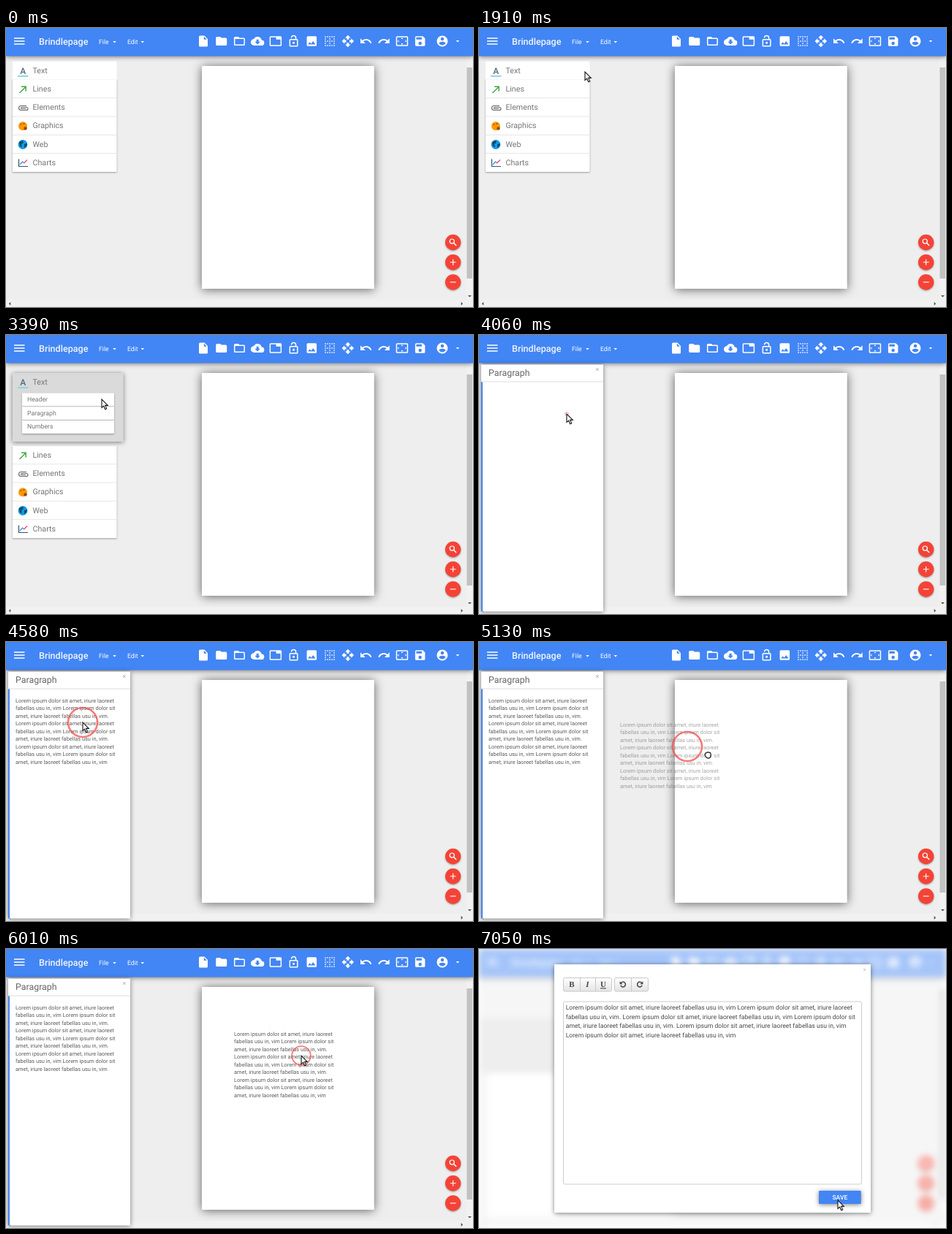
An HTML page for the animation above (8 s loop, 639 by 382 pixels).

```html
<!DOCTYPE html>
<html lang="en">
<head>
<meta charset="utf-8">
<title>Page editor</title>
<style>
html, body { margin: 0; width: 100%; height: 100%; overflow: hidden; background: #fff; }
svg { display: block; width: 639px; height: 382px; font-family: Roboto, Arial, sans-serif; text-rendering: geometricPrecision; }
.low { filter: drop-shadow(0 1px 1px rgba(0,0,0,.35)); }
.mid { filter: drop-shadow(0 1px 3px rgba(0,0,0,.5)); }
.deep { filter: drop-shadow(0 1px 7px rgba(0,0,0,.6)); }
</style>
</head>
<body>
<svg id="stage" viewBox="0 0 639 382"></svg>
<script>
const LOOP = 8000;
const stage = document.getElementById('stage');

// ---- markup helpers ----
const rect = (x, y, w, h, fill, extra = '') =>
  `<rect x="${x}" y="${y}" width="${w}" height="${h}" fill="${fill}" ${extra}/>`;
const text = (x, y, size, fill, str, extra = '') =>
  `<text x="${x}" y="${y}" font-size="${size}" fill="${fill}" ${extra}>${str}</text>`;
const line = (d, color, width = 1, extra = '') =>
  `<path d="${d}" fill="none" stroke="${color}" stroke-width="${width}" ${extra}/>`;
const group = (id, body, extra = '') => `<g id="${id}" ${extra}>${body}</g>`;
const icon = (x, y, body, size = 18) =>
  `<g transform="translate(${x - size / 2} ${y - size / 2}) scale(${size / 24})" fill="#fff" fill-rule="evenodd">${body}</g>`;
const shape = d => `<path d="${d}"/>`;
const caret = (x, y, color) => `<path d="M${x - 2.3} ${y - 1}h4.6l-2.3 2.4z" fill="${color}"/>`;

// ---- toolbar ----
const folder = 'M2 6q0-2 2-2h6l2 2h8q2 0 2 2v10q0 2-2 2H4q-2 0-2-2z';
const wideFrame = 'M3 3h18q2 0 2 2v14q0 2-2 2H3q-2 0-2-2V5q0-2 2-2z';
const undo = 'M12.5 8C9.8 8 7.4 9 5.6 10.6L2 7v9h9l-3.6-3.6c1.4-1.2 3.1-1.9 5.1-1.9 3.5 0 6.5 2.3 7.6 5.5l2.4-.8C21.1 11 17.1 8 12.5 8z';
const tools = [
  shape('M6 2h8l6 6v12q0 2-2 2H6q-2 0-2-2V4q0-2 2-2zM13 3.5V9h5.5z'),
  shape(folder),
  shape(folder + 'M4 8v10h16V8z'),
  shape('M6 20a6 6 0 0 1-.6-12A7.5 7.5 0 0 1 19.4 10 5 5 0 0 1 19 20zM17 13h-3V9h-4v4H7l5 5z'),
  shape(wideFrame + 'M3 5v14h18V9h-8V5z'),
  shape('M6 8h9V6a3.1 3.1 0 0 0-6.2 0H7a5 5 0 0 1 10 0v2h1q2 0 2 2v10q0 2-2 2H6q-2 0-2-2V10q0-2 2-2zM6 10v10h12V10zM12 13a2 2 0 0 1 0 4 2 2 0 0 1 0-4z'),
  shape('M5 3h14q2 0 2 2v14q0 2-2 2H5q-2 0-2-2V5q0-2 2-2zM8.5 13.5L5 18h14l-4.5-6-3.5 4.5z'),
  line('M3 4h18M3 12h18M3 20h18M4 3v18M12 3v18M20 3v18', '#fff', 2, 'stroke-dasharray="2"'),
  shape('M10 9h4V6h3l-5-5-5 5h3zM9 10H6V7l-5 5 5 5v-3h3zM23 12l-5-5v3h-3v4h3v3zM14 15h-4v3H7l5 5 5-5h-3z'),
  shape(undo),
  `<g transform="matrix(-1 0 0 1 24 0)">${shape(undo)}</g>`,
  shape(wideFrame + 'M3 5v14h18V5zM12 5.5L10 8h4zM18 10v4l2.5-2zM6 10l-2.5 2L6 14zM14 16h-4l2 2.5z'),
  shape('M5 3h12l4 4v12q0 2-2 2H5q-2 0-2-2V5q0-2 2-2zM12 13a3 3 0 0 0 0 6 3 3 0 0 0 0-6zM5 5v4h10V5z'),
];
const person = shape('M12 2a10 10 0 0 1 0 20 10 10 0 0 1 0-20zM12 5a3 3 0 0 0 0 6 3 3 0 0 0 0-6zM12 19.2c2.5 0 4.7-1.3 6-3.2 0-2-4-3.1-6-3.1s-6 1.1-6 3.1c1.3 1.9 3.5 3.2 6 3.2z');
const header = rect(0, 0, 639, 38.5, '#4285f4', 'class="mid"')
  + line('M11 14h14.5M11 18h14.5M11 22h14.5', '#fff', 1.5)
  + text(45, 23, 12.6, '#f0f5ff', 'Brindlepage', 'font-weight="500"')
  + text(127, 21.7, 8.7, '#fff', 'File') + caret(148.5, 19, '#fff')
  + text(166, 21.7, 8.7, '#fff', 'Edit') + caret(186.8, 19, '#fff')
  + tools.map((body, i) => icon(270 + i * 24.72, 18, body)).join('')
  + icon(597, 18, person) + caret(618, 18, '#fff');

// ---- workspace ----
const fab = (y, body) => `<circle cx="611.7" cy="${y}" r="10.7" fill="#f44336" class="low"/>` + icon(611.7, y, body, 13.5);
const lens = '<circle cx="9.5" cy="9.5" r="5.5" fill="none" stroke="#fff" stroke-width="2.2"/>' + line('M14 14l6 6', '#fff', 2.6);
const workspace = rect(0, 0, 639, 382, '#eee')
  + rect(268, 52, 235.7, 305, '#fff', 'class="deep"')
  + rect(630, 38, 9, 344, '#f1f1f1') + rect(0, 372, 639, 10, '#f1f1f1')
  + rect(630.5, 54, 7.5, 289, '#c1c1c1')
  + '<path d="M632 366h5l-2.5 2.6zM622.7 375v5l2.5-2.5zM6.3 375v5l-2.5-2.5z" fill="#555"/>';
const fabs = fab(293.5, lens) + fab(320.8, shape('M5 11h6V5h2v6h6v2h-6v6h-2v-6H5z')) + fab(348, shape('M5 11h14v2H5z'));

// ---- side menu ----
const GREY = '#757575';
const menuIcons = [
  line('M18.5 89l8-8M21 80.3h6.2v6.2', '#43a84a', 1.5),
  line('M28 106.5h-7.5a3 3 0 0 0 0 6H28a2 2 0 0 0 0-4h-6.5a1 1 0 0 0 0 2H27', '#666', 1.1),
  '<circle cx="23" cy="134.3" r="6" fill="#ff9800"/><circle cx="26.5" cy="137.5" r="2.2" fill="#8d4b16"/>'
    + '<circle cx="20.5" cy="132" r="1.1" fill="#d84315"/><circle cx="24.5" cy="131" r="1.1" fill="#795548"/>',
  '<circle cx="23" cy="159.5" r="6.4" fill="#0d9be8"/><path d="M18 156l5-2 1 3-3 2 1 4-3-1zM25 159l4-1-1 4-3 2z" fill="#1b4965"/>',
  line('M17.5 179.5v10H30', '#37536d', 1.2) + line('M19 187l3.5-4 2.5 2', '#2f8fd8', 1.2) + line('M24.5 185l4.5-4.5', '#e8436c', 1.3),
];
const menuRows = ['Lines', 'Elements', 'Graphics', 'Web', 'Charts'].map((label, i) => {
  const y = 70.5 + i * 25.3;
  return (i ? line(`M9 ${y}h142.5`, '#e6e6e6') : '') + menuIcons[i] + text(36.5, y + 16.2, 10.7, GREY, label);
}).join('');
const subRows = ['Header', 'Paragraph', 'Numbers'].map((label, i) =>
  rect(22, 79.5 + i * 18.7, 126, 18, '#fff', 'class="low"') + text(29, 91 + i * 18.7, 8.7, GREY, label)).join('');
const menu = group('rows', rect(9, 70.5, 142.5, 126.5, '#fff', 'class="low"') + menuRows)
  + rect(9, 45.5, 142.5, 25, '#fff', 'id="card"')
  + rect(9, 45.5, 142.5, 25, '#dadada', 'id="cardOpen" class="mid"')
  + group('cardHead', text(23.3, 63, 12, '#54697a', 'A', 'font-weight="500" text-anchor="middle"')
    + rect(16, 65, 14.5, 1.8, '#7fd6e0') + text(36.5, 62, 10.7, GREY, 'Text'))
  + group('subRows', subRows);

// ---- paragraph panel, dragged copy, dialog ----
const LOREM = 'Lorem ipsum dolor sit amet, iriure laoreet fabellas usu in, vim';
const verse = ['Lorem ipsum dolor sit amet, iriure laoreet', 'fabellas usu in, vim Lorem ipsum dolor sit', 'amet, iriure laoreet fabellas usu in, vim'];
const paragraph = Array.from({ length: 9 }, (_, i) =>
  text(0, 2.6 + i * 10.52, 7.4, '#5c5c5c', verse[i % 3] + (i === 2 || i === 5 ? '.' : ''))).join('');
const panel = rect(3, 40.5, 167, 338, '#fff', 'class="mid"') + rect(3, 64, 2, 314.5, '#4285f4')
  + line('M3 64h167', '#ddd') + text(13, 56.3, 12.4, '#666', 'Paragraph') + text(159.5, 50, 9, '#aaa', '×')
  + group('panelText', paragraph);

const dialogLines = [
  `${LOREM} ${verse[0]}`,
  `fabellas usu in, vim. ${LOREM} Lorem ipsum dolor sit`,
  `amet, iriure laoreet fabellas usu in, vim. ${LOREM}`,
  LOREM,
];
const button = (x, w) => rect(x, 39.5, w, 18.5, 'url(#btn)', 'stroke="#c8c8c8" rx="2"');
const letter = (x, str, style) => text(x, 52.3, 11, '#444', str, `text-anchor="middle" font-family="Liberation Serif, serif" ${style}`);
const turn = line('M-2.9 -1.8a3.4 3.4 0 1 1 -.3 3', '#444', 1.5) + '<path d="M-4.4 -4.2v4h4z" fill="#444"/>';
const dialog = rect(103, 21, 433, 340, '#fff', 'class="mid"')
  + button(115.5, 66) + button(185.5, 46) + line('M138.5 39.5v18.5M159.5 39.5v18.5M208.5 39.5v18.5', '#c8c8c8')
  + letter(127, 'B', 'font-weight="700"') + letter(148.5, 'I', 'font-weight="700" font-style="italic"')
  + letter(170, 'U', 'font-weight="700" text-decoration="underline"')
  + `<g transform="translate(197 48.5)">${turn}</g><g transform="matrix(-1 0 0 1 220 48.5)">${turn}</g>`
  + text(525.5, 31, 8, '#bbb', '×')
  + rect(115.5, 72, 408, 250, '#fff', 'stroke="#ccc" rx="2"')
  + dialogLines.map((str, i) => text(118.7, 83.2 + i * 12.5, 8.64, '#484848', str)).join('')
  + rect(465, 331, 57.7, 18, '#4285f4', 'rx="1" class="mid"')
  + text(493.8, 342.8, 8.5, '#fff', 'SAVE', 'font-weight="500" text-anchor="middle"');

const arrow = '<path d="M0 0v11.6l2.7-2.4 2 4.6 2-.9-2-4.5h3.6z" fill="#fff" stroke="#111" stroke-width="1.1"/>';
const hand = '<path d="M3.5 6.5q0-2 1.5-1.6 1-1.6 2-.6 1.3-1 2.2.2 1.8-.3 1.8 1.7v2.6q0 3-3 3.3-2.6.2-3.6-2-2-2.5-.9-3.6z" fill="#fff" stroke="#111" stroke-width="1.2"/>';

stage.innerHTML = '<defs><linearGradient id="btn" x2="0" y2="1"><stop stop-color="#fff"/><stop offset="1" stop-color="#e4e4e4"/></linearGradient></defs>'
  + group('scene', workspace + group('menu', menu)
    + group('dimSide', rect(0, 95, 110, 75, '#dcdcdc') + rect(11, 170, 99, 197, '#fff'))
    + header + group('panel', panel) + fabs + group('copy', paragraph))
  + rect(0, 0, 639, 382, '#fff', 'id="veil"')
  + group('dialog', dialog)
  + '<circle id="ring" fill="none" stroke="#f0504c"/>'
  + group('arrow', arrow) + group('hand', hand);

const el = Object.fromEntries([...stage.querySelectorAll('[id]')].map(node => [node.id, node]));
const set = (id, attrs) => { for (const key in attrs) el[id].setAttribute(key, attrs[key]); };
const show = (id, opacity) => set(id, { opacity, display: opacity > 0 ? 'inline' : 'none' });
const move = (id, [x, y]) => set(id, { transform: `translate(${x} ${y})` });

// ---- timing ----
const mix = (a, b, p) => a + (b - a) * p;
const span = (t, from, to) => Math.min(1, Math.max(0, (t - from) / (to - from)));
const smooth = p => p * p * (3 - 2 * p);
const out = p => 1 - (1 - p) ** 2;
function track(keys, t, ease) {
  let i = keys.findIndex(key => key[0] > t);
  if (i < 0) i = keys.length;
  const a = keys[Math.max(0, i - 1)], b = keys[Math.min(i, keys.length - 1)];
  const p = a === b ? 0 : ease(span(t, a[0], b[0]));
  return [mix(a[1], b[1], p), mix(a[2], b[2], p)];
}
const pointerPath = [[900, 507, 153], [1910, 145, 60], [3080, 145, 60], [3390, 131, 88], [3520, 120, 108],
  [4200, 120, 108], [4533, 105, 110], [4700, 105, 110]];
const handPath = [[4700, 105, 110], [4870, 165, 124], [4990, 245, 140], [5130, 306, 147], [5710, 404, 146]];
const copyPath = [[4700, 105, 110], [4870, 140, 120], [4990, 214, 134], [5130, 285, 143], [5710, 404, 146]];
const savePath = [[6310, 404, 146], [7050, 491, 344]];

// The picture advances in uneven ticks: [first, last, count].
const ticks = [[0, 0, 1], [900, 1910, 8], [2350, 2350, 1], [2670, 3390, 6], [3520, 3640, 2], [3930, 4060, 2],
  [4200, 4870, 5], [4990, 5130, 2], [5270, 5710, 4], [6010, 7050, 8]]
  .flatMap(([from, to, n]) => Array.from({ length: n }, (_, i) => n > 1 ? mix(from, to, i / (n - 1)) : from));

// Press pops the ring to full size; release shrinks it away.
function ringRadius(t) {
  const presses = [[2350, 2670], [3640, 3930], [4533, 6010]];
  const press = presses.find(([down, up]) => t >= down && t < up + 220);
  return press ? mix(20, 0, span(t, press[1] - 90, press[1] + 160)) : 0;
}

function draw(t) {
  const open = out(span(t, 2600, 3080));
  const panelIn = t < 6160 ? span(t, 3800, 4050) : 0;
  const textIn = out(span(t, 4050, 4400));
  const dialogIn = smooth(span(t, 6080, 6620));
  const dragging = t >= 4700 && t < 6010;

  const card = { y: mix(45.5, 52, open), width: mix(142.5, 151.5, open), height: mix(25, 94, open) };
  set('card', card);
  set('cardOpen', card);
  show('cardOpen', open);
  move('cardHead', [0, 6.3 * open]);
  move('rows', [0, 81 * open]);
  show('subRows', span(open, .5, 1));
  show('menu', t < 6160 ? 1 : 0);
  show('dimSide', t < 6160 ? 0 : 1);

  show('panel', panelIn);
  show('panelText', textIn);
  set('panelText', { transform: `translate(${mix(86, 13, textIn)} ${mix(99, 80, textIn)}) scale(${textIn})` });

  const grip = track(copyPath, t, out);
  show('copy', t < 4700 ? 0 : dragging ? .55 : 1);
  move('copy', [grip[0] - 92, grip[1] - 30]);

  el.scene.style.filter = dialogIn ? `blur(${4 * dialogIn}px)` : 'none';
  show('veil', .52 * dialogIn);
  show('dialog', dialogIn);
  move('dialog', [0, -24 * (1 - dialogIn)]);

  const pointer = t < 6010 ? track(pointerPath, t, smooth) : track(savePath, t, smooth);
  show('arrow', t >= 900 && !dragging ? 1 : 0);
  move('arrow', pointer);
  show('hand', dragging ? 1 : 0);
  move('hand', track(handPath, t, out));

  const r = ringRadius(t);
  const [cx, cy] = dragging ? grip : pointer;
  show('ring', r > .5 ? .75 : 0);
  set('ring', { cx, cy, r, 'stroke-width': mix(.5, 2.6, r / 20) });
}

function frame() {
  const now = performance.now() % LOOP;
  draw(ticks.findLast(tick => tick <= now));
  requestAnimationFrame(frame);
}
frame();
</script>
</body>
</html>
```
